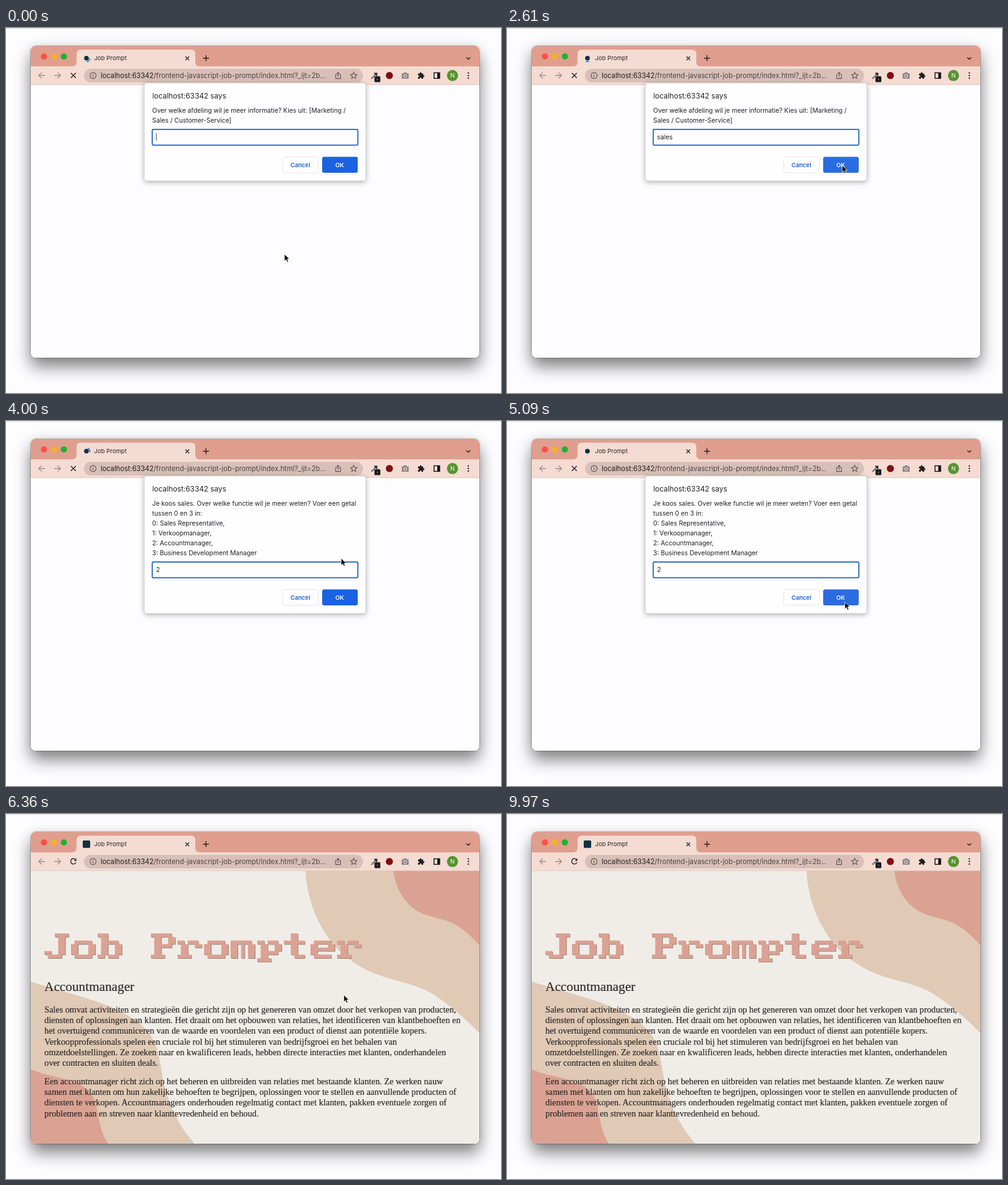
Recreate the animation shown at these times as an HTML page. Size 800 by 590 pixels, loop 10000 ms.

```html
<!DOCTYPE html>
<html lang="nl">
<head>
<meta charset="utf-8">
<title>Job Prompt</title>
<style>
html, body { margin: 0; width: 100%; height: 100%; overflow: hidden; background: #fdfcfe; }
#window { position: absolute; left: 40px; top: 29px; width: 725px; height: 504px; border-radius: 8px;
  box-shadow: 0 0 1px 0.5px rgba(0,0,0,.4), 0 15px 27px rgba(0,0,0,.46), 0 2px 22px rgba(0,0,0,.1); }
svg { position: absolute; left: 0; top: 0; display: block; font-family: Inter, sans-serif; }
.dialog { filter: drop-shadow(0 2px 4px rgba(0,0,0,.3)); }
.dialog text { font-size: 10.3px; fill: #202124; }
.dialog .head { font-size: 11.8px; }
.dialog .btn { font-size: 9.5px; font-weight: 600; text-anchor: middle; }
.logo { fill: #dba293; fill-rule: evenodd; filter: drop-shadow(1px 1px 0 #9b857b); }
.copy { font: 14.29px "Liberation Serif", serif; fill: #2f2a29; stroke: #2f2a29; stroke-width: .2; }
.line { fill: none; stroke: #2b2423; stroke-width: 1.4; }
.soft { stroke: #5f504d; stroke-width: 1.1; }
.dim { stroke: #a38f8a; }
</style>
</head>
<body>
<div id="window"></div>
<svg width="800" height="590" viewBox="0 0 800 590">
  <defs><clipPath id="frame"><rect x="40" y="29" width="725" height="504" rx="8"/></clipPath></defs>
  <path d="M0 .5H800" stroke="#dcdbdd"/>
  <g clip-path="url(#frame)">
    <path fill="#fdfcfe" d="M40 29H765V533H40z"/>
    <g id="page">
      <path fill="#f0ede8" d="M40 92H765V533H40z"/>
      <g fill="#e0cab5">
        <path d="M484 92C487 145 508 193 545 227C602 275 650 265 691 292C721 312 741 330 765 354V92z"/>
        <path d="M40 271C100 290 150 300 190 322C239 347 245 373 251 413C260 470 280 505 305 533H40z"/>
      </g>
      <g fill="#dba293">
        <path d="M626 92C631 130 652 153 676 162C706 173 726 168 765 212V92z"/>
        <path d="M40 413C80 428 110 426 132 446C155 468 143 500 165 533H40z"/>
      </g>
      <g class="logo" id="logo" role="img" aria-label="Job Prompter"></g>
      <text class="copy" x="62" y="286" style="font-size:21.3px">Accountmanager</text>
      <g class="copy" id="copy"></g>
    </g>
    <path fill="#e09e8e" d="M40 29H765V63H40z"/>
    <path fill="#f4dcd3" d="M40 62H107Q114 62 114 55V42Q114 35 121 35H299Q306 35 306 42V55Q306 62 313 62H765V92H40z"/>
    <path d="M40 91.7H765" stroke="#dcc3ba" stroke-width=".8"/>
    <circle cx="61.3" cy="46" r="5" fill="#fc4f47"/>
    <circle cx="77.3" cy="46" r="5" fill="#f5b125"/>
    <circle cx="93.5" cy="46" r="5" fill="#1bb32e"/>
    <text x="142.5" y="52.2" font-size="9.6" fill="#2b2423">Job Prompt</text>
    <rect x="126" y="66" width="451" height="22" rx="11" fill="#d8c0b8"/>
    <text x="153" y="80.7" font-size="11.16" fill="#50423f"><tspan fill="#241d1c">localhost:63342</tspan>/frontend-javascript-job-prompt/index.html?_ijt=2b...</text>

    <g class="line">
      <path d="M290 46l6 6m0-6l-6 6M318.5 48.8h9.5m-4.75-4.75v9.5M744 47.5l3.2 3 3.2-3"/>
      <path class="dim" d="M63 76.8H53m4.7-4.8l-4.8 4.8 4.8 4.8M78 76.8h10m-4.7-4.8l4.8 4.8-4.8 4.8"/>
      <path id="stop" d="M104.8 72.8l8 8m0-8l-8 8"/>
      <g id="reload"><path d="M112.6 74A4.4 4.4 0 1 0 113 78.2"/><path d="M113.7 71.6v4.2h-4.2z" fill="#2b2423" stroke="none"/></g>
      <g class="soft">
        <circle cx="140.7" cy="76.8" r="4.9"/><path d="M140.7 76v3.4m0-5.4v1.2"/>
        <path d="M534.8 75.2h-2v6.4h7.8v-6.4h-2M536.7 79v-7m-2.2 2.1l2.2-2.2 2.2 2.2"/>
        <path d="M562 71.6l1.5 3.4 3.7.4-2.8 2.5.8 3.6-3.2-1.9-3.2 1.9.8-3.6-2.8-2.5 3.7-.4z"/>
      </g>
      <path d="M590.5 82l6.5-6.5" stroke="#777" stroke-width="2.4"/>
      <path d="M595.5 72.5l4.5 4.5M597.5 75l2.3-2.3" stroke-width="2.4"/>
      <rect x="691.7" y="72.4" width="9.2" height="9" stroke="#111"/>
    </g>
    <rect x="595.5" y="78" width="9.5" height="9.5" rx="1.5" fill="#1d1b1c"/>
    <path d="M599.4 83h1.8" stroke="#ccc"/>
    <circle cx="619.6" cy="76.8" r="5.8" fill="#800f14"/>
    <path fill="#858585" d="M639.5 73.5h2.6l1-1.8h4l1 1.8h2.6v8.6h-11.2z"/>
    <circle cx="645.1" cy="77.6" r="2.4" fill="#858585" stroke="#f4dcd3" stroke-width="1.1"/>
    <path transform="translate(664.8 71)scale(.5)" fill="#1d1b1c" d="M20.5 11H19V7q0-2-2-2h-4V3.5a2.5 2.5 0 0 0-5 0V5H4q-2 0-2 2v3.8h1.5a2.7 2.7 0 0 1 0 5.4H2V20q0 2 2 2h3.8v-1.5a2.7 2.7 0 0 1 5.4 0V22H17q2 0 2-2v-4h1.5a2.5 2.5 0 0 0 0-5z"/>
    <path fill="#111" d="M697 72h4v9.5h-4z"/>
    <circle cx="721.6" cy="76.8" r="9" fill="#55942f"/>
    <text x="721.6" y="80.2" font-size="9.5" fill="#fff" text-anchor="middle">N</text>
    <g fill="#2b2423"><circle cx="747.2" cy="72.6" r="1.2"/><circle cx="747.2" cy="76.8" r="1.2"/><circle cx="747.2" cy="81" r="1.2"/></g>
    <rect id="favicon" fill="#12303e"/>
    <path id="spinner" fill="none" stroke="#1a73e8" stroke-width="1.7"/>
  </g>
  <g id="dialogs"></g>
  <path id="arrow" d="M0 0v11.2l2.6-2.3 1.8 4 2-.9-1.8-3.9h3.5z" fill="#000" stroke="#fff" stroke-width=".8"/>
  <path id="beam" d="M-3-6q3 0 3 2q0-2 3-2M0-5V5M-3 6q3 0 3-2q0 2 3 2M-1.5 1.5h3" fill="none" stroke="#111" stroke-width="1.1"/>
</svg>
<script>
const LOOP = 10000, CLICK1 = 2660, OPEN2 = 2780, CLICK2 = 5400, LOADED = 5520, HIDE_MOUSE = 7200;
const $ = id => document.getElementById(id);
const show = (el, on) => el.setAttribute('display', on ? 'inline' : 'none');
const clamp = x => Math.min(1, Math.max(0, x));
const smooth = x => x * x * (3 - 2 * x);

// Slab pixel letters on a grid 7 wide, baseline at 7
const glyphs = {
  J: 'M3 0h4v1h-1v5h-1v1h-4v-1h-1v-1h2v1h2v-5h-1z',
  o: 'M1 2h5v1h1v3h-1v1h-5v-1h-1v-3h1zM2 3v3h3v-3z',
  b: 'M0 0h3v2h3v1h1v3h-1v1h-3v-1h-1v1h-2v-1h1v-5h-1zM3 3v3h2v-3z',
  P: 'M0 0h6v1h1v2h-1v1h-3v2h1v1h-4v-1h1v-5h-1zM3 1v2h2v-2z',
  r: 'M0 2h2v1h1v-1h3v1h1v1h-2v-1h-2v3h1v1h-4v-1h1v-3h-1z',
  m: 'M0 2h6v1h1v4h-2v-4h-1v4h-1v-4h-1v4h-2z',
  p: 'M0 2h2v1h1v-1h3v1h1v2h-1v1h-3v1h1v1h-4v-1h1v-4h-1zM3 3v2h2v-2z',
  t: 'M2 0h2v2h2v1h-2v3h2v1h-3v-1h-1v-3h-2v-1h2z',
  e: 'M1 2h5v1h1v2h-5v1h4v1h-5v-1h-1v-3h1zM2 3v1h3v-1z'
};
$('logo').innerHTML = [...'Job Prompter'].map((c, i) => glyphs[c] ?
  `<path transform="translate(${62 + 43 * i} 193)scale(5.6 5.72)" d="${glyphs[c]}"/>` : '').join('');

const lines = (list, x, y, step) =>
  list.map((s, i) => `<text x="${x}" y="${y + i * step}">${s}</text>`).join('');

$('copy').innerHTML = lines([
  'Sales omvat activiteiten en strategieën die gericht zijn op het genereren van omzet door het verkopen van producten,',
  'diensten of oplossingen aan klanten. Het draait om het opbouwen van relaties, het identificeren van klantbehoeften en',
  'het overtuigend communiceren van de waarde en voordelen van een product of dienst aan potentiële kopers.',
  'Verkoopprofessionals spelen een cruciale rol bij het stimuleren van bedrijfsgroei en het behalen van',
  'omzetdoelstellingen. Ze zoeken naar en kwalificeren leads, hebben directe interacties met klanten, onderhandelen',
  'over contracten en sluiten deals.'], 62, 321, 17.2) + lines([
  'Een accountmanager richt zich op het beheren en uitbreiden van relaties met bestaande klanten. Ze werken nauw',
  'samen met klanten om hun zakelijke behoeften te begrijpen, oplossingen voor te stellen en aanvullende producten of',
  'diensten te verkopen. Accountmanagers onderhouden regelmatig contact met klanten, pakken eventuele zorgen of',
  'problemen aan en streven naar klanttevredenheid en behoud.'], 62, 437, 17.2);

function makeDialog(message, answer, keyTimes, from, to) {
  const drop = 16 * (message.length - 2);
  const g = document.createElementNS('http://www.w3.org/2000/svg', 'g');
  g.innerHTML = `<rect x="223.5" y="89" width="358" height="${158 + drop}" rx="3.5" fill="#fefdff" stroke="#c9c7ca" stroke-width=".6"/>
    <text class="head" x="236.5" y="114">localhost:63342 says</text>${lines(message, 236.3, 137.2, 16)}
    <g transform="translate(0 ${drop})">
      <rect x="236.4" y="163.9" width="332.2" height="25.4" rx="1.5" fill="#fff" stroke="#1c5fbe" stroke-width="1.8"/>
      <text class="answer" x="242.5" y="180"></text>
      <path class="caret" d="M0 170v12" stroke="#222" stroke-width=".9"/>
      <rect x="447.3" y="208.5" width="57.4" height="25.4" rx="3" fill="#fefdff" stroke="#dfe1e8" stroke-width=".8"/>
      <text class="btn" x="475.7" y="224.5" style="fill:#1b64d2">Cancel</text>
      <rect class="ok" x="511" y="208.3" width="57.5" height="25.8" rx="3"/>
      <text class="btn" x="539.3" y="224.5" style="fill:#fff">OK</text>
    </g>`;
  g.setAttribute('class', 'dialog');
  $('dialogs').append(g);
  const [text, caret, ok] = ['.answer', '.caret', '.ok'].map(s => g.querySelector(s));

  // Draws the dialog and tells whether the mouse is over its input
  return (t, [mx, my]) => {
    const open = t >= from && t < to;
    show(g, open);
    if (!open) return false;
    const rest = from ? (1 - clamp((t - from) / 250)) ** 2 : 0;
    g.setAttribute('opacity', 1 - rest);
    g.setAttribute('transform', `translate(402 -100)scale(${1 - .05 * rest})translate(-402 100)`);
    const typed = keyTimes.filter(k => k <= t);
    text.textContent = answer.slice(0, typed.length);
    caret.setAttribute('transform', `translate(${243 + (typed.length ? text.getComputedTextLength() : 0)} 0)`);
    show(caret, (t - (typed.at(-1) ?? from)) % 1000 < 500);
    const overOk = mx > 511 && mx < 568 && my > 208 + drop && my < 234 + drop;
    ok.setAttribute('fill', overOk ? '#2a6ce0' : '#1a62e2');
    return mx > 236 && mx < 569 && my > 163 + drop && my < 190 + drop;
  };
}

const dialogs = [
  makeDialog(['Over welke afdeling wil je meer informatie? Kies uit: [Marketing /', 'Sales / Customer-Service]'],
    'sales', [1320, 1470, 1600, 1740, 1860], 0, CLICK1),
  makeDialog(['Je koos sales. Over welke functie wil je meer weten? Voer een getal', 'tussen 0 en 3 in:',
    '0: Sales Representative,', '1: Verkoopmanager,', '2: Accountmanager,', '3: Business Development Manager'],
    '2', [3500], OPEN2, CLICK2)
];

// Each move: start, end, target x, target y
const moves = [[250, 1000, 353, 178], [1950, 2500, 541.7, 222], [4000, 4800, 546, 292.5]];
function mouseAt(t) {
  let pos = [450, 365.5];
  for (const [a, b, x, y] of moves) {
    const k = smooth(clamp((t - a) / (b - a)));
    pos = [pos[0] + (x - pos[0]) * k, pos[1] + (y - pos[1]) * k];
  }
  return pos;
}

function drawFavicon(t, loading) {
  const half = loading ? 3.8 : 6;
  const box = { x: 130 - half, y: 48.8 - half, width: 2 * half, height: 2 * half, rx: loading ? half : 1.5 };
  for (const name in box) $('favicon').setAttribute(name, box[name]);
  show($('spinner'), loading);
  const cycle = (t + 242) / 1333, phase = cycle % 1 * 2;
  const base = (t / 1568 + Math.floor(cycle) * .75) * 2 * Math.PI;
  const tail = base + 1.5 * Math.PI * smooth(clamp(phase - 1));
  const head = base + 1.5 * Math.PI * smooth(clamp(phase)) + .1;
  const point = a => `${130 + 5.6 * Math.cos(a)} ${48.8 + 5.6 * Math.sin(a)}`;
  $('spinner').setAttribute('d', `M${point(tail)}A5.6 5.6 0 ${head - tail > Math.PI ? 1 : 0} 1 ${point(head)}`);
}

function draw() {
  const t = performance.now() % LOOP, loading = t < LOADED, mouse = mouseAt(t);
  show($('page'), !loading);
  show($('stop'), loading);
  show($('reload'), !loading);
  drawFavicon(t, loading);
  const overInput = dialogs.map(update => update(t, mouse)).some(Boolean);
  for (const id of ['arrow', 'beam']) {
    $(id).setAttribute('transform', `translate(${mouse})`);
    show($(id), t < HIDE_MOUSE && (id === 'beam') === overInput);
  }
  requestAnimationFrame(draw);
}
draw();
</script>
</body>
</html>
```
